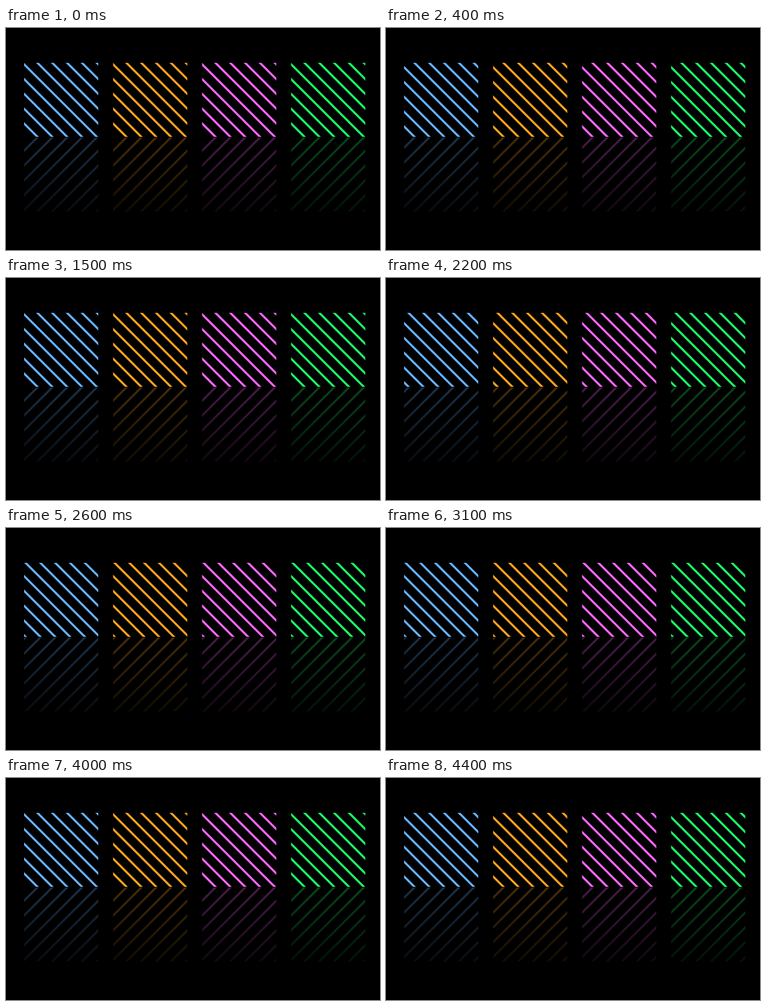
These frames come from a looping animation (600 by 357 pixels, 4500 ms). An HTML page with a canvas:

```html
<!DOCTYPE html>
<html lang="en">
<head>
<meta charset="utf-8">
<title>Reflected stripes</title>
<style>
  html, body { margin: 0; height: 100%; overflow: hidden; background: #000; }
  canvas { display: block; }
</style>
</head>
<body>
<canvas width="600" height="357"></canvas>
<script>
const ctx = document.querySelector('canvas').getContext('2d');
const colors = ['#66b3ff', '#ffa31a', '#ff66ff', '#1aff66'];
const left = 29, top_ = 56, size = 119, gap = 1;
const period = size / 5, band = period / 5;
const mirrorTop = top_ + size + gap;

// Diagonal stripes in a square whose top left corner is the origin
function stripes(color, step) {
  ctx.beginPath();
  ctx.rect(0, 0, size, size);
  ctx.clip();
  ctx.beginPath();
  for (let k = -1; k <= 10; k++) {
    const x = k * period + (step - 0.5) * band;
    ctx.moveTo(x + 10, size + 10);
    ctx.lineTo(x - size - 10, -10);
  }
  ctx.strokeStyle = color;
  ctx.lineWidth = band / Math.SQRT2;
  ctx.stroke();
}

const fade = ctx.createLinearGradient(0, mirrorTop, 0, mirrorTop + size);
fade.addColorStop(0, 'rgba(0,0,0,0.733)');
fade.addColorStop(1, 'rgba(0,0,0,0.933)');

function draw(now) {
  const step = Math.floor((now % 4500) / 100) % 5;
  ctx.fillStyle = '#000';
  ctx.fillRect(0, 0, 600, 357);
  colors.forEach((color, i) => {
    const x = left + i * 6 * period;
    ctx.save();
    ctx.translate(x, top_);
    stripes(color, step);
    ctx.restore();
    ctx.save();
    ctx.translate(x, mirrorTop + size);
    ctx.scale(1, -1);
    stripes(color, step);
    ctx.restore();
  });
  ctx.fillStyle = fade;
  ctx.fillRect(0, mirrorTop, 600, size + 1);
}

const start = performance.now();
function tick() {
  draw(performance.now() - start);
  requestAnimationFrame(tick);
}
tick();
</script>
</body>
</html>
```
